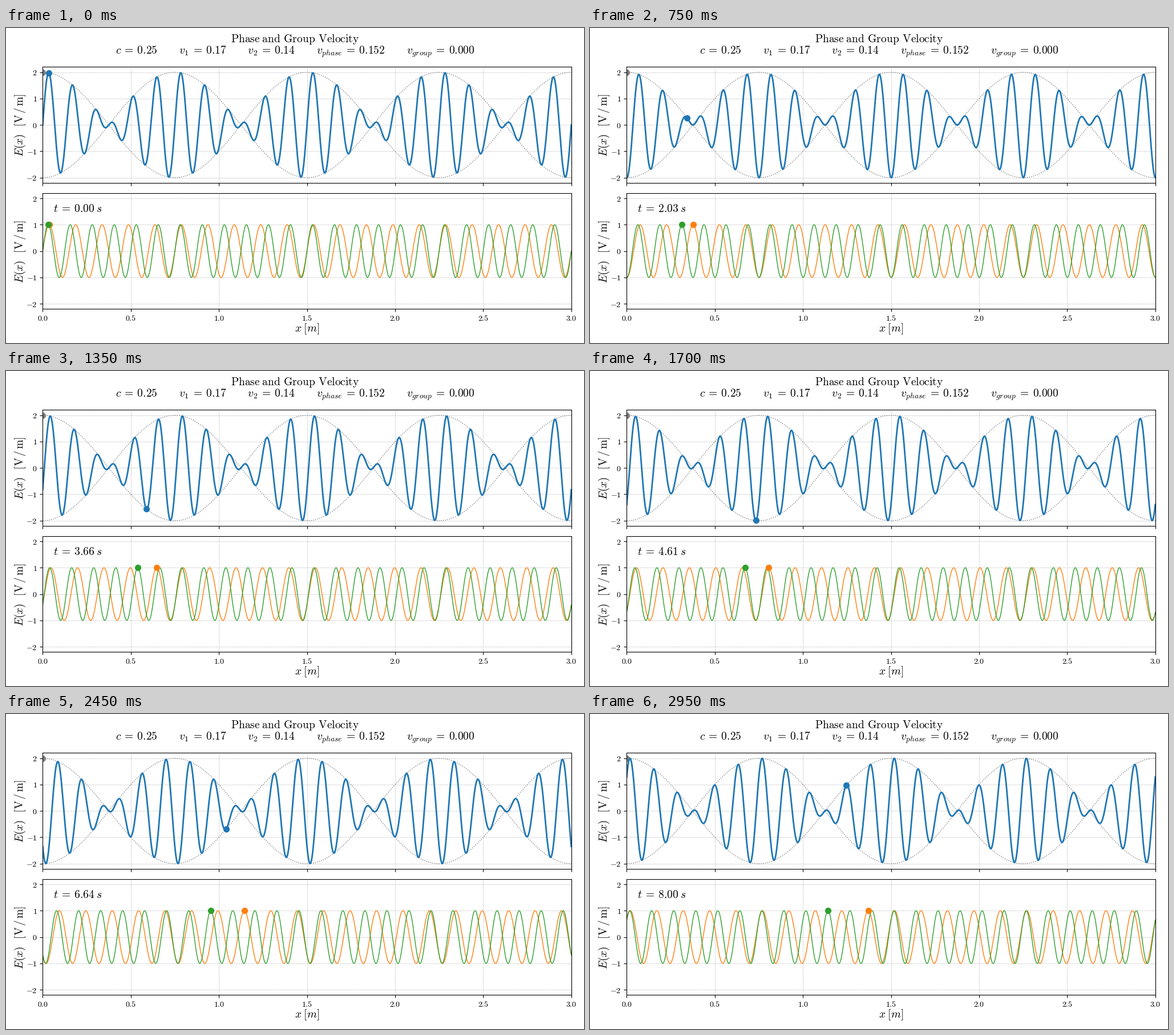
Write a matplotlib script that moves like this. It is 1013 px wide and 553 px high and loops after 3000 ms.

```python
import numpy as np
import matplotlib.pyplot as plt
from matplotlib.animation import FuncAnimation

W, H, DPI = 1013, 553, 100
FRAMES, INTERVAL = 60, 50
T_END = 8.0
LEFT, RIGHT = 64.3, 990.7

plt.rcParams["mathtext.fontset"] = "cm"

# Two waves of equal frequency in a dispersive medium
C = 0.25
LAM1, LAM2 = 0.15, 0.125
V1, V2 = C / 1.5, C / 1.8
K1, K2 = 2 * np.pi / LAM1, 2 * np.pi / LAM2
OMEGA = K1 * V1
K_MEAN, K_HALF = (K1 + K2) / 2, (K2 - K1) / 2
V_PHASE = OMEGA / K_MEAN
V_GROUP = 0.0

x = np.linspace(0, 3, 2000)
envelope = 2 * np.cos(K_HALF * x)

fig = plt.figure(figsize=(W / DPI, H / DPI), dpi=DPI, facecolor="white")


def label(px, py, text, size=14, **kw):
    """Text with its baseline at a pixel position counted from the top left."""
    kw.setdefault("ha", "center")
    return fig.text(px / W, 1 - py / H, text, fontsize=size, va="baseline", **kw)


def equation(name, value, digits=2):
    return rf"{name}\:=\:{value:.{digits}f}"


def panel(top, bottom, x_labels):
    ax = fig.add_axes([LEFT / W, 1 - bottom / H, (RIGHT - LEFT) / W, (bottom - top) / H])
    ax.set_xlim(0, 3)
    ax.set_ylim(-2.2, 2.2)
    xt = np.arange(0, 3.1, 0.5)
    yt = range(-2, 3)
    ax.set_xticks(xt, [f"${v:.1f}$" for v in xt] if x_labels else [""] * len(xt))
    ax.set_yticks(yt, [f"${v}$" for v in yt])
    ax.grid(linestyle=":")
    label(30, (top + bottom) / 2 + 1, r"$E(x)\;\;\:[\mathrm{V\,/\,m}]$",
          rotation=90, rotation_mode="anchor")
    return ax


def dot(ax, color, px=0.0, py=0.0):
    return ax.plot([px], [py], "o", color=color, markersize=7)[0]


values = [equation("c", C), equation("v_1", V1), equation("v_2", V2),
          equation("v_{phase}", V_PHASE, 3), equation("v_{group}", V_GROUP, 3)]
label(506.5, 25, r"$\mathrm{Phase\;and\,\:Group\,\:Velocity}$")
label(506.5, 46, "$" + r"\qquad\;".join(values) + "$")
label((LEFT + RIGHT) / 2, 533, r"$x\;[m]$")
clock = label(83, 323, "", ha="left")

top_ax = panel(68.4, 272.0, False)
low_ax = panel(289.8, 493.4, True)

for sign in (1, -1):
    top_ax.plot(x, sign * envelope, ":", color="tab:gray", lw=1)
dot(top_ax, "tab:gray", 0, 2)
wave_sum, = top_ax.plot(x, 0 * x, color="tab:blue", lw=2)
dot_sum = dot(top_ax, "tab:blue")

wave1, = low_ax.plot(x, 0 * x, color="tab:orange", lw=1)
wave2, = low_ax.plot(x, 0 * x, color="tab:green", lw=1)
dot1 = dot(low_ax, "tab:orange")
dot2 = dot(low_ax, "tab:green")


def update(i):
    t = T_END * i / (FRAMES - 1)
    e1 = np.sin(K1 * x - OMEGA * t)
    e2 = np.sin(K2 * x - OMEGA * t)
    wave1.set_ydata(e1)
    wave2.set_ydata(e2)
    wave_sum.set_ydata(e1 + e2)

    # Each dot rides on one crest
    dot1.set_data([LAM1 / 4 + V1 * t], [1])
    dot2.set_data([LAM2 / 4 + V2 * t], [1])
    crest = np.pi / 2 / K_MEAN + V_PHASE * t
    dot_sum.set_data([crest], [2 * np.cos(K_HALF * crest)])

    clock.set_text("$" + equation("t", t) + r"\;s$")
    return wave1, wave2, wave_sum, dot1, dot2, dot_sum, clock


anim = FuncAnimation(fig, update, frames=FRAMES, interval=INTERVAL,
                     repeat=True, repeat_delay=0, blit=False)
plt.show()
```
